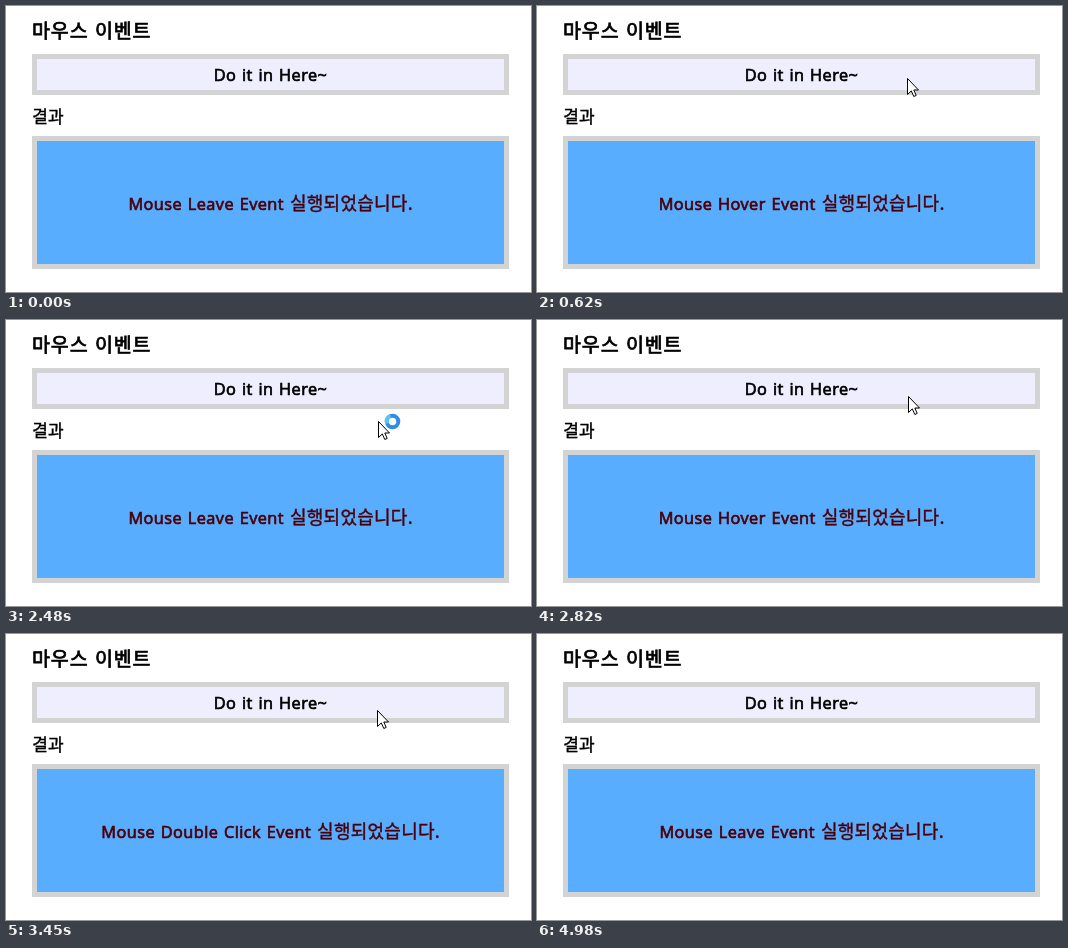
Recreate the animation shown at these times as an HTML page. Size 525x286 px, loop 5.38 s.

```html
<!DOCTYPE html>
<html lang="ko">
<head>
<meta charset="utf-8">
<title>마우스 이벤트</title>
<style>
  html, body { margin: 0; width: 100%; height: 100%; overflow: hidden; background: #fff; }
  svg { display: block; width: 525px; height: 286px; }
  text { font-family: "Noto Sans CJK KR", "Noto Sans CJK", sans-serif; fill: var(--ink); stroke: var(--ink); stroke-width: .4; --ink: #000; }
  .title { font-size: 19.5px; letter-spacing: .9px; stroke-width: .75; }
  .label { font-size: 17px; }
  .latin { font: 16.3px "Open Sans", "Noto Sans", sans-serif; letter-spacing: .45px; word-spacing: 1px; stroke-width: .7; }
  .hangul { font-size: 18px; letter-spacing: .25px; }
  .panel { stroke: #d3d3d3; stroke-width: 5; }
  .mid { text-anchor: middle; }
  #message { --ink: #4b0008; }
</style>
</head>
<body>
<svg viewBox="0 0 525 286">
  <text class="title" x="26" y="32.3">마우스 이벤트</text>
  <rect class="panel" x="28.5" y="50.5" width="472" height="36" fill="#eef"/>
  <text class="latin mid" x="264.5" y="75">Do it in Here~</text>
  <text class="label" x="26.3" y="116.6">결과</text>
  <rect class="panel" x="28.5" y="132.5" width="472" height="128" fill="#59adff"/>
  <text id="message" class="mid" x="264.7" y="204"><tspan id="action" class="latin"></tspan><tspan class="hangul" dx="6">실행되었습니다.</tspan></text>
  <g id="pointer">
    <path id="arrow" d="M.5 .5V16.5L4.3 12.9L6.8 18.5L9.2 17.4L6.8 12H11.5Z" fill="#fff" stroke="#000"/>
    <g id="ring" fill="none" stroke-width="4">
      <circle r="5.8" fill="#fff" stroke="#2c8ee8"/>
      <path id="glint" d="M-5.8 0A5.8 5.8 0 0 1 0 -5.8" stroke="#5cc4f2"/>
    </g>
  </g>
</svg>
<script>
const LOOP = 5380;
const LEAVE = "Leave", HOVER = "Hover", DOUBLE = "Double Click";

// start time, pointer x, pointer y, event, pointer kind
const steps = [
  [0, null, null, LEAVE],
  [70, 476, 270, LEAVE],
  [140, 456, 234, LEAVE],
  [210, 430, 190, LEAVE],
  [280, 404, 151, LEAVE],
  [350, 383, 122, LEAVE],
  [420, 373, 102, LEAVE],
  [490, 371, 93, LEAVE],
  [550, 370, 81, HOVER],
  [620, 370, 72, HOVER],
  [1550, 370, 79, HOVER],
  [1620, 372, 98, LEAVE],
  [1820, 372, 101, LEAVE],
  [2480, 372, 101, LEAVE, "busy"],
  [2610, 372, 99, LEAVE],
  [2680, 372, 91, LEAVE],
  [2750, 371, 81, HOVER],
  [2820, 371, 76, HOVER],
  [3190, 371, 76, HOVER, "wait"],
  [3450, 371, 76, DOUBLE],
  [4710, 374, 86, DOUBLE],
  [4780, 388, 112, LEAVE],
  [4850, 424, 170, LEAVE],
  [4910, 479, 250, LEAVE],
  [4980, null, null, LEAVE]
];

const $ = id => document.getElementById(id);
const [action, pointer, arrow, ring, glint] =
  ["action", "pointer", "arrow", "ring", "glint"].map($);
const show = (el, on) => el.setAttribute("visibility", on ? "visible" : "hidden");
const move = (el, value) => el.setAttribute("transform", value);

function draw(time) {
  const t = time % LOOP;
  const [start, x, y, event, kind] = steps.findLast(step => step[0] <= t);
  const visible = x !== null;
  action.textContent = `Mouse ${event} Event`;
  show(arrow, visible && kind !== "wait");
  show(ring, visible && kind);
  if (visible) move(pointer, `translate(${x} ${y})`);
  if (kind) {
    move(ring, kind === "wait" ? "scale(1.5)" : "translate(14.5 .5)");
    move(glint, `rotate(${Math.floor((t - start) / 65) * 45 - 20})`);
  }
}

const begin = performance.now();
function tick() {
  draw(performance.now() - begin);
  requestAnimationFrame(tick);
}
tick();
</script>
</body>
</html>
```
